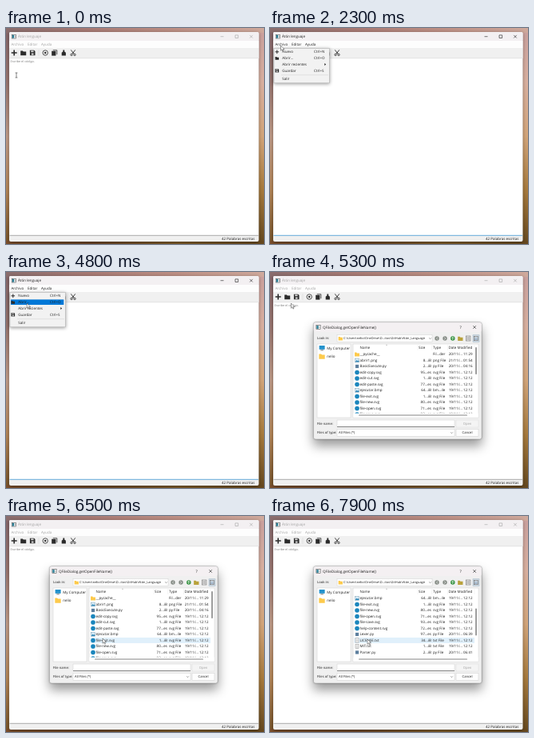
An HTML page that plays this animation: 323x270 px, repeating every 8 s.

```html
<!DOCTYPE html>
<html lang="es">
<head>
<meta charset="utf-8">
<title>Editor</title>
<style>
html, body { margin: 0; height: 100%; overflow: hidden; }
svg { display: block; width: 100vw; height: 100vh; }
text { font-family: "Open Sans", "Noto Sans", sans-serif; text-rendering: geometricPrecision; white-space: pre; }
.shadow { filter: drop-shadow(0 1px 2px #0006); }
.deep { filter: drop-shadow(0 0 1px #0004) drop-shadow(0 8px 7px #0006); }
</style>
</head>
<body>
<svg id="stage" viewBox="0 0 323 270" preserveAspectRatio="none"></svg>
<script>
const DARK = '#1c1c1c', GREY = '#a3a3a3', BLUE = '#0078d7', YELLOW = '#fdca4c';

const rect = (x, y, w, h, fill, extra = '') =>
  `<rect x="${x}" y="${y}" width="${w}" height="${h}" fill="${fill}" ${extra}/>`;
const box = (x, y, w, h, fill = '#fff', line = '#d0d0d0') =>
  rect(x, y, w, h, fill, `stroke="${line}" stroke-width=".5"`);
const disc = (x, y, r, fill) => `<circle cx="${x}" cy="${y}" r="${r}" fill="${fill}"/>`;
const line = (d, color = DARK, w = .7) => `<path d="${d}" fill="none" stroke="${color}" stroke-width="${w}"/>`;
const shape = (d, fill = DARK) => `<path d="${d}" fill="${fill}"/>`;
// y is the vertical middle of the line of text
const text = (x, y, str, size = 4.5, fill = DARK, anchor = 'start') =>
  `<text x="${x}" y="${y + size * .33}" font-size="${size}" fill="${fill}" text-anchor="${anchor}">${str}</text>`;
const group = (id, body) => `<g id="${id}">${body}</g>`;

const folder = (x, y, fill = DARK, s = 1) =>
  shape(`M${x - 3.5 * s} ${y - 2.8 * s}h${2.6 * s}l${s} ${s}h${3.4 * s}v${4.8 * s}h${-7 * s}z`, fill);
const floppy = (x, y, s = 1) =>
  shape(`M${x - 3.3 * s} ${y - 3.3 * s}h${5.2 * s}l${1.4 * s} ${1.4 * s}v${5.2 * s}h${-6.6 * s}z`, '#2b2b2b') +
  rect(x - 2 * s, y - 2.6 * s, 3.4 * s, 1.8 * s, '#ddd') + rect(x - 1.4 * s, y + .6 * s, 2.8 * s, 2 * s, '#ddd');
const plus = (x, y, r, w) => line(`M${x - r} ${y}h${2 * r}M${x} ${y - r}v${2 * r}`, '#2b2b2b', w);
const appIcon = (x, y) => box(x - 2.6, y - 2.3, 5.2, 4.6, '#fff', '#333') +
  rect(x - 2.2, y - 1.9, 2.4, 3.8, '#2b7f96') + rect(x + .8, y - 1, 1.2, 2, '#bbb');
const chevron = (x, y) => line(`M${x - 1.4} ${y - .7}l1.4 1.4l1.4 -1.4`, '#444', .5);

const gradient = (id, end, colors) => `<linearGradient id="${id}" x2="${end[0]}" y2="${end[1]}">` +
  colors.map((c, i) => `<stop offset="${i / (colors.length - 1)}" stop-color="${c}"/>`).join('') + '</linearGradient>';

function backdrop() {
  return '<defs>' + gradient('top', [1, 0], ['#8a6d6d', '#a87a74', '#bd8f84', '#cfa99c']) +
    gradient('left', [0, 1], ['#84666a', '#9a7670', '#c19c88', '#b58657', '#775329']) +
    gradient('right', [0, 1], ['#c99f9d', '#d9b09f', '#d3a57a', '#a77a3c', '#65481f']) +
    gradient('bottom', [1, 0], ['#7b4f2c', '#6a4527', '#7d5b2a', '#66481f']) + '</defs>' +
    rect(0, 0, 160, 270, 'url(#left)') + rect(160, 0, 163, 270, 'url(#right)') +
    rect(0, 0, 323, 6, 'url(#top)') + rect(0, 266, 323, 4, 'url(#bottom)');
}

function frameText(color) {
  return text(15, 10.6, 'Átón lenguaje', 4.5, color) +
    text(6.5, 20.6, 'Archivo', 4.5, color) + text(27, 20.6, 'Editar', 4.5, color) +
    text(44, 20.6, 'Ayuda', 4.5, color) +
    line('M268.5 10.7h4M287 8.9h3.6v3.6h-3.6zM305.2 8.9l3.6 3.6m0 -3.6l-3.6 3.6', color, .6);
}

function mainWindow() {
  return rect(4, 5, 312.5, 262, '#f0f0f0', 'rx="2" class="shadow"') +
    rect(4, 5, 312.5, 12, '#f3f0f2', 'rx="2"') + rect(4, 16, 312.5, 9, '#fdfdfd') +
    rect(4, 25, 312.5, 13, '#f0f0f0') + rect(4.5, 37.7, 311.5, 221.5, '#fff') +
    line('M4.5 37.7h311.5', '#cfcfcf', .5) + appIcon(10, 10.7) +
    text(5.6, 41.5, 'Escribe el código.', 3.75, '#7a7a7a') +
    text(270, 263.2, '42 Palabras escritas') +
    plus(10.2, 31, 3.5, 1.6) + folder(21.7, 31.3, '#2b2b2b') + floppy(33.2, 31) +
    line('M41 27v8', '#d5d5d5', .5) +
    `<circle cx="49.2" cy="31" r="3.2" fill="none" stroke="#2b2b2b" stroke-width=".8"/>` + disc(49.2, 31, 1.2, '#2b2b2b') +
    rect(57.2, 28.8, 5.2, 5.8, '#2b2b2b') + line('M58.8 27.8h5v5.4', '#2b2b2b', .8) +
    shape('M71.4 27.4h1.8v2l1.7 1.4v3.8h-5.2v-3.8l1.7 -1.4z', '#2b2b2b') +
    line('M81.3 27.4l4 5.2M86.7 27.4l-4 5.2', '#2b2b2b', .9) +
    '<g fill="none" stroke="#2b2b2b" stroke-width=".8"><circle cx="82" cy="33.4" r="1.2"/><circle cx="86" cy="33.4" r="1.2"/></g>';
}

const MENU_Y = [29.8, 37.7, 45.4, 53.3, 64];

function menu() {
  const labels = ['Nuevo', 'Abrir...', 'Abrir recientes', 'Guardar', 'Salir'];
  const keys = ['Ctrl+N', 'Ctrl+O', '', 'Ctrl+S', ''];
  return rect(5, 25.3, 69.5, 43.5, '#f2f2f2', 'stroke="#a8a8a8" stroke-width=".5" class="shadow"') +
    rect(6, 0, 66.3, 6.6, BLUE, 'id="menuHover"') +
    labels.map((s, i) => text(15.3, MENU_Y[i], s) + text(55, MENU_Y[i], keys[i])).join('') +
    plus(8.8, 29.8, 2.3, 1) + folder(8.8, 37.9, '#2b2b2b', .65) + floppy(8.8, 53.3, .7) +
    shape('M68.3 43.9l1.8 1.5l-1.8 1.5z') + line('M14 58.7h59', '#d0d0d0', .5);
}

const svgRow = (name, size) => [name + '.svg', size, 'svg File', '19/11/... 12:12'];
const FILES = [
  ['__pycache__', '', 'Fil...der', '20/11/... 11:29'],
  ['abrir1.png', '8...iB', 'png File', '21/11/... 01:54'],
  ['BasicExecute.py', '2...iB', 'py File', '20/11/... 04:16'],
  svgRow('edit-copy', '95...es'),
  svgRow('edit-cut', '1...iB'),
  svgRow('edit-paste', '77...es'),
  ['ejecutar.bmp', '64...iB', 'bm...ile', '19/11/... 12:12'],
  svgRow('file-exit', '1...iB'),
  svgRow('file-new', '80...es'),
  svgRow('file-open', '71...es'),
  svgRow('file-save', '93...es'),
  svgRow('help-content', '72...es'),
  ['Lexer.py', '97...es', 'py File', '20/11/... 06:39'],
  ['LICENSE.txt', '34...iB', 'txt File', '19/11/... 12:12'],
  ['MIT.txt', '1...iB', 'txt File', '19/11/... 12:12'],
  ['Parser.py', '2...iB', 'py File', '20/11/... 06:41']
];
const ROW_TOP = 99.2, ROW_H = 7.5;

function fileIcon(name, y) {
  const x = 109, ext = name.split('.')[1];
  if (!ext) return folder(x, y, YELLOW, .85);
  if (ext === 'svg') return disc(x, y, 2.8, '#1b86bd');
  if (ext === 'py') return rect(x - 2.1, y - 2.1, 4.2, 4.2, '#5d7f9e');
  if (ext === 'txt') return box(x - 2, y - 2.7, 4, 5.4, '#fff', '#888') +
    line(`M${x - 1.2} ${y - 1}h2.4m-2.4 1.2h2.4m-2.4 1.2h2.4`, '#999', .4);
  return box(x - 2.6, y - 2.4, 5.2, 4.8, '#d9edf8', '#7d9cb0') +
    shape(`M${x - 2.3} ${y + 2}l1.8 -2.4l1.2 1.2l1 -.8l.9 2z`, '#2f87b7');
}

function fileRows(first, hover) {
  // the eleventh row is cut off by the scroll bar
  const rows = FILES.slice(first, first + 11).map(([name, size, type, date], i) => {
    const y = ROW_TOP + ROW_H * (i + .5);
    return (i === hover ? rect(105.5, y - 3.5, 150.5, 7, '#e0f0fb') : '') + fileIcon(name, y) +
      text(112.5, y, name) + text(202, y, size, 4.5, DARK, 'end') +
      text(204, y, type) + text(223.7, y, date);
  });
  return rows.join('') + rect(104.3, 176.6, 156.4, 5.1, '#fff') +
    rect(111, 178.6, 136, 1, '#858585', 'rx=".5"') +
    rect(257.2, 94 + first * 3.6, 1.6, 34, '#858585', 'rx=".8"');
}

function dialog() {
  const small = (x, y, s) => text(x, y, s, 4.2);
  const round = (x, fill, d) => disc(x, 83, 2.7, fill) + line(d, '#fff');
  return rect(54.5, 63, 210.5, 146, '#f0f0f0', 'rx="2.5" stroke="#9a9a9a" stroke-width=".5" class="deep"') +
    rect(54.8, 63.2, 209.9, 11.8, '#f4f0f2', 'rx="2"') + appIcon(60.5, 69) +
    text(66, 69, 'QFileDialog.getOpenFileName()', 4.6) + text(238.5, 69, '?', 5, DARK, 'middle') +
    line('M254.3 67.2l3.6 3.6m0 -3.6l-3.6 3.6', DARK, .6) +
    small(59, 83, 'Look in:') + box(84, 78.3, 119, 9.4) + folder(88.3, 83.2, YELLOW, .75) +
    text(92, 83, 'C:\\Users\\nelio\\OneDrive\\D...itos\\GitHub\\Atón_Language', 3.92) + chevron(200.5, 83) +
    round(209, '#858b85', 'M210 81.5l-1.6 1.5l1.6 1.5') +
    round(219, '#858b85', 'M218.2 81.5l1.6 1.5l-1.6 1.5') +
    round(228.8, '#2f8f3b', 'M228.8 85v-3.6m-1.4 1.4l1.4 -1.4l1.4 1.4') +
    folder(238.3, 83.3, '#b9a23c', .9) +
    box(245.3, 80, 5.6, 6, '#eee', '#555') + line('M246.3 82h3.6m-3.6 2h3.6', '#555', .6) +
    box(254, 78.8, 8, 8.4, '#d8e3ec', '#8fa9bd') + box(255.4, 80.2, 5, 5.6, '#eee', '#444') +
    line('M256 82h3.8m-3.8 1.3h3.8m-3.8 1.3h3.8', '#3f6f9d', .5) +
    box(59, 90, 42, 92) + rect(61.6, 92, 7, 4.8, '#2492cc') + line('M63.3 97.8h3.6', '#444') +
    text(71.3, 95.2, 'My Computer') + folder(65, 105.5, YELLOW, 1.05) + text(71.3, 105.4, 'nelio') +
    box(104, 90, 157, 92) + text(112.5, 94.4, 'Name') + text(186, 94.4, 'Size') + text(204, 94.4, 'Type') +
    text(223.5, 94.4, 'Date Modified') +
    line('M145 91.7l1 -.8l1 .8', '#777', .4) + line('M185 91v7M202.7 91v7M222.5 91v7M256 91v7', '#e2e2e2', .4) +
    group('files', '') +
    small(59, 189.8, 'File name:') + box(84, 185, 147, 8.5) + line('M84 193.5h147', '#858585', 1) +
    box(233, 185, 28, 9, '#f4f4f4', '#dcdcdc') + text(247, 189.6, 'Open', 4.2, GREY, 'middle') +
    small(59, 201, 'Files of type:') + box(84, 196.3, 147, 9) + small(86, 200.8, 'All Files (*)') + chevron(227.5, 201) +
    box(233, 196.3, 28, 9, '#fdfdfd', '#cfcfcf') + text(247, 200.8, 'Cancel', 4.2, DARK, 'middle');
}

const stage = document.getElementById('stage');
stage.innerHTML = backdrop() + mainWindow() +
  group('active', frameText(DARK) + line('M4.5 259.3h311.5', '#3f97d3', .8)) +
  group('inactive', frameText(GREY) + line('M4.5 259.3h311.5', '#8c8c8c', .7)) +
  group('menu', menu()) + group('dialog', dialog()) +
  group('beam', line('M-1.4 -3h2.8M-1.4 3h2.8M0 -3v6', '#333', .6)) +
  group('arrow', '<path d="M0 0v6.2l1.5 -1.4l1 2.3l1 -.4l-1 -2.2h2z" fill="#fff" stroke="#222" stroke-width=".45"/>');

const el = id => document.getElementById(id);
const show = (id, on) => el(id).setAttribute('display', on ? 'inline' : 'none');

// time, x, y of the pointer tip
const PATH = [[0, 13, 59], [700, 13, 59], [1300, 13.5, 22], [2500, 13.5, 22], [3100, 25.5, 39],
  [5900, 26.5, 39], [6500, 121, 153], [8000, 122, 154]];

function pointer(t) {
  const i = PATH.findIndex(p => p[0] > t), [t0, x0, y0] = PATH[i - 1], [t1, x1, y1] = PATH[i];
  const k = (t - t0) / (t1 - t0), e = k * k * (3 - 2 * k);
  return [x0 + (x1 - x0) * e, y0 + (y1 - y0) * e];
}

let listState = '';
function draw(now) {
  const t = Math.floor(now % 8000 / 100) * 100;
  const [x, y] = pointer(t);
  const menuOpen = t >= 1500 && t < 5200, dialogOpen = t >= 5200;
  const beam = !menuOpen && !dialogOpen && y > 38;
  show('active', menuOpen);
  show('inactive', !menuOpen);
  show('menu', menuOpen);
  show('dialog', dialogOpen);
  show('beam', beam);
  show('arrow', !beam);
  for (const id of ['beam', 'arrow']) el(id).setAttribute('transform', `translate(${x} ${y})`);

  const item = MENU_Y.find(m => Math.abs(m - y) < 3.9);
  show('menuHover', menuOpen && item);
  if (item) el('menuHover').setAttribute('y', item - 3.3);

  const first = t < 6900 ? 0 : t < 7500 ? 3 : 6;
  const hover = x > 105 && x < 256 ? Math.floor((y - ROW_TOP) / ROW_H) : -1;
  if (listState !== first + ',' + hover) {
    listState = first + ',' + hover;
    el('files').innerHTML = fileRows(first, hover);
  }
}

const start = performance.now();
function tick() {
  draw(performance.now() - start);
  requestAnimationFrame(tick);
}
tick();
</script>
</body>
</html>
```
